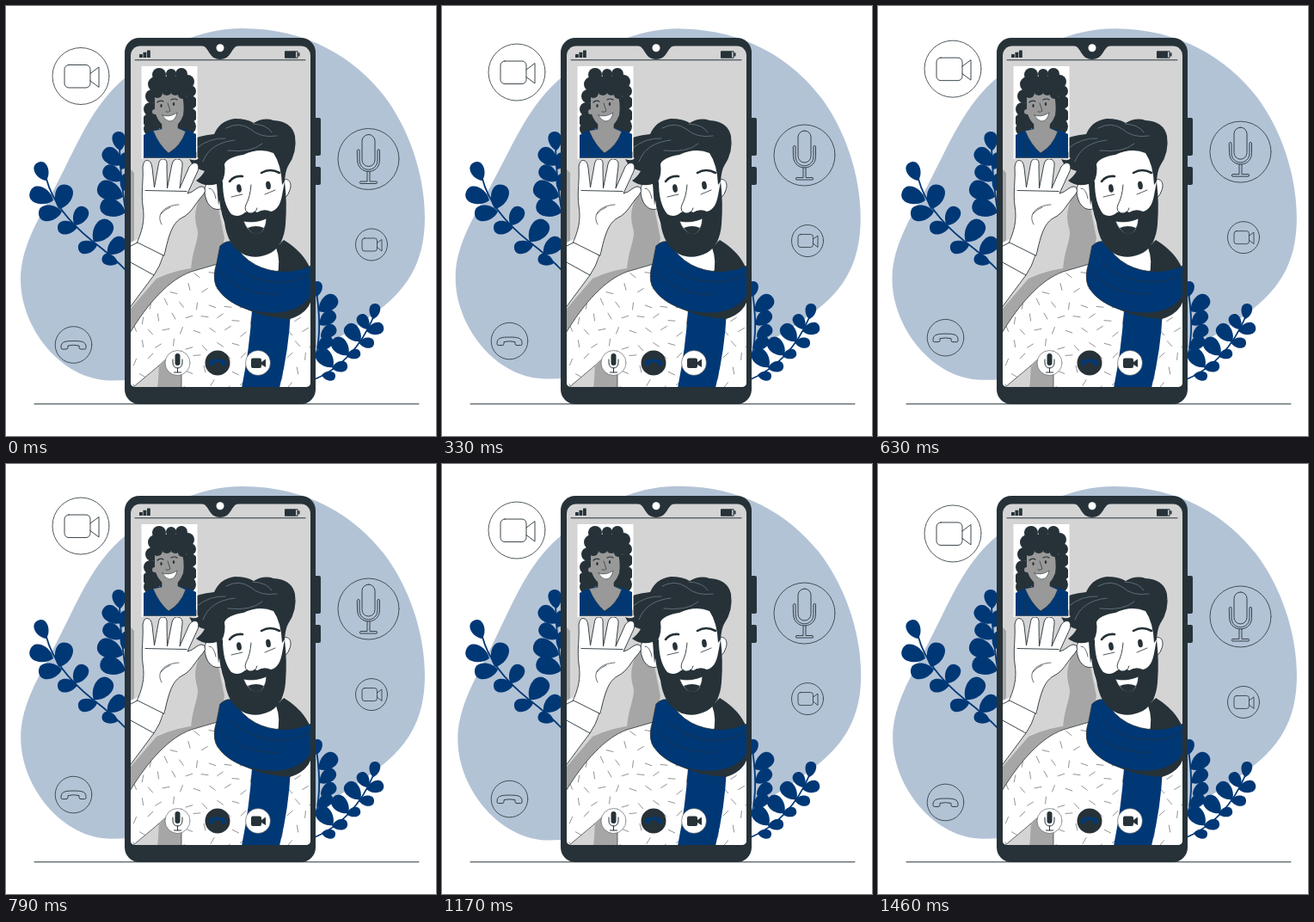
These frames come from a looping animation (500 px wide and 500 px high, 1500 ms). An HTML page with a canvas:

```html
<!DOCTYPE html>
<html lang="en">
<head>
<meta charset="utf-8">
<title>Video call</title>
<style>
html, body { margin: 0; width: 100%; height: 100%; overflow: hidden; background: #fff; }
canvas { display: block; width: 500px; height: 500px; }
</style>
</head>
<body>
<canvas id="stage"></canvas>
<script>
const INK = '#263238', NAVY = '#003876', PALE = '#b3c3d6';
const LIGHT = '#d4d4d4', SHADE = '#a6a6a6', SKIN = '#999', WHITE = '#fff';
const LOOP = 1500, STEPS = 36;

const canvas = document.getElementById('stage');
const ratio = window.devicePixelRatio || 1;
canvas.width = canvas.height = 500 * ratio;
let ctx = canvas.getContext('2d');

function paint(shape, fill, stroke, width = 0.9) {
  const path = typeof shape === 'string' ? new Path2D(shape) : shape;
  if (fill) { ctx.fillStyle = fill; ctx.fill(path); }
  if (stroke) { ctx.strokeStyle = stroke; ctx.lineWidth = width; ctx.stroke(path); }
}
const line = (d, color = INK, width = 0.9) => paint(d, null, color, width);

function circle(x, y, r, fill, stroke, width) {
  const p = new Path2D();
  p.arc(x, y, r, 0, Math.PI * 2);
  paint(p, fill, stroke, width);
}
function oval(x, y, rx, ry, angle, fill) {
  const p = new Path2D();
  p.ellipse(x, y, rx, ry, angle, 0, Math.PI * 2);
  paint(p, fill);
}
function box(x, y, w, h, r, fill, stroke, width) {
  const p = new Path2D();
  p.roundRect(x, y, w, h, r);
  paint(p, fill, stroke, width);
}
function clipped(d, draw) {
  ctx.save();
  ctx.clip(d instanceof Path2D ? d : new Path2D(d));
  draw();
  ctx.restore();
}

// Teardrop leaf from its base to its tip
function leaf([bx, by, tx, ty]) {
  const n = Math.hypot(tx - bx, ty - by);
  ctx.save();
  ctx.translate(bx, by);
  ctx.rotate(Math.atan2(ty - by, tx - bx));
  ctx.scale(n, n);
  paint('M0 0C.25 -.42 1 -.5 1 0C1 .5 .25 .42 0 0Z', NAVY);
  ctx.restore();
}
function branch(stem, leaves) {
  line(stem, NAVY, 1.8);
  leaves.forEach(leaf);
}

function plants() {
  branch('M47 201C54 228 74 252 100 273Q125 292 141 309', [
    [47, 203, 37, 182], [55, 226, 28, 216], [62, 236, 71, 208], [65, 239, 38, 242],
    [80, 255, 92, 234], [83, 257, 60, 258], [102, 274, 121, 250], [106, 278, 84, 282],
    [118, 288, 138, 271], [130, 299, 112, 292]
  ]);
  branch('M132 164Q133 205 141 250', [
    [133, 168, 130, 146], [134, 185, 114, 167], [135, 203, 114, 188], [136, 222, 107, 209],
    [139, 240, 110, 230], [134, 190, 142, 171], [136, 215, 143, 195]
  ]);
  branch('M357 435Q405 415 428 360', [
    [427, 364, 430, 346], [421, 376, 411, 359], [412, 390, 396, 371], [398, 406, 381, 387],
    [380, 420, 363, 400], [419, 378, 439, 373], [410, 391, 428, 392], [396, 407, 412, 403],
    [379, 421, 397, 418], [367, 429, 383, 431]
  ]);
  branch('M357 417Q369 385 361 333', [
    [361, 338, 362, 320], [364, 355, 384, 338], [365, 371, 382, 356],
    [366, 385, 383, 373], [363, 400, 378, 385]
  ]);
}

function bubbles() {
  circle(87, 81.5, 33, null, INK, 0.8);
  box(68, 68.5, 30, 26.5, 5, null, INK, 0.9);
  line('M98 78.5L108 71V94.5L98 87');

  circle(421.5, 178, 35.5, null, INK, 0.8);
  box(414, 149.5, 15, 37, 7.5, null, INK);
  line('M408.5 167.5Q409.7 166 411 167.5V179C411 194 432 194 432 179V167.5Q433.2 166 434.5 167.5V179C434.5 197 408.5 197 408.5 179Z');
  line('M420 192.5V204H412Q410.5 205.5 412 206.5H431Q432.5 205.5 431 204H423V192.5');

  circle(425, 277.5, 18.5, null, INK, 0.8);
  box(414, 270, 17.5, 15, 3, null, INK, 0.8);
  line('M431.5 275.5L437 271.5V285L431.5 280.5', INK, 0.8);

  circle(78.5, 394, 21.3, null, INK, 0.8);
  line('M64 396C64 390 70 389.5 78.5 389.5S93 390 93 396V397.5Q93 399 91.5 399H87Q85 399 85 397V395Q78.5 393.5 72 395V397Q72 399 70 399H65.5Q64 399 64 397.5Z');
}

function sweater() {
  const body = 'M143 382C165 345 190 318 215 309Q232 304 246 300L356 330V445H143Z';
  paint(body, WHITE, INK, 0.8);
  clipped(body, () => {
    for (let row = 0; row < 9; row++) {
      for (let col = 0; col < 13; col++) {
        const k = Math.sin(row * 12.9898 + col * 78.233) * 43758.5453;
        const spin = (k - Math.floor(k)) * Math.PI;
        const x = 150 + col * 18 + (row % 2) * 9, y = 314 + row * 16 + 4 * Math.sin(k);
        const dx = 4 * Math.cos(spin), dy = 4 * Math.sin(spin);
        line(`M${x - dx} ${y - dy}L${x + dx} ${y + dy}`, '#777', 0.8);
      }
    }
  });
  paint('M147 444L178 418L176 444Z', LIGHT);
  paint('M176 444L178 419Q191 405 204 401V444Z', SHADE);
  line('M147 444L178 418Q191 405 204 401V444', INK, 0.7);
}

function hand() {
  paint('M143 276L158 269L186 287L171 315L143 353Z', WHITE);
  line('M172 313L143 352');
  paint('M151 278C158 263 162 250 159 232C157 217 160 202 159 187Q160 179 164.5 179.5Q169 180 170 188L172.5 211L177 186Q178 177 183 178Q188 178 187 187L187.5 212L193 184Q195 177 200 178Q206 179 205 186L202 212L213 187Q217 181 222 183Q225 186 223 192L211 218Q216 217 222 212Q228 208 231 212Q233 215 229 220C220 229 216 241 205 246C194 252 190 263 184 290Z', WHITE, INK, 0.9);
  line('M162 214.5L210 215.5');
  line('M181 254C174 242 184 232 201 231M180 242Q185 236 191 234', INK, 0.7);
  paint('M145 279L153 275L183 290Q179 303 172 313L143 297Z', WHITE, INK, 0.9);
}

function scarf() {
  paint('M272 280V300Q290 314 318 313L320 272Z', WHITE, INK, 0.8);
  paint('M315 314Q320 297 314 281L323 272Q346 286 354 306V336L325 322Z', INK);
  paint('M286 354L331 354Q329 400 318 444H274Q283 400 286 354Z', NAVY);
  paint('M262 342Q286 361 330 364Q350 358 355 342L350 326Z', INK);
  paint('M249 279Q257 271 266 275Q272 291 290 301Q319 316 355 302V336Q342 357 310 357C282 357 254 345 244 325Q240 314 245 299Z', NAVY, INK, 0.8);
  line('M246 305C259 325 287 337 317 335M262 299Q283 321 321 321M321 321Q342 320 354 311', INK, 0.7);
}

function head() {
  paint('M248 208C239 201 230 205 231 216C232 229 239 239 250 236Z', WHITE, INK);
  paint('M320 203C329 198 333 206 330 214Q327 224 320 224Z', WHITE, INK);
  line('M236 212Q242 212 244 224', INK, 0.7);
  paint('M247 185Q260 165 295 164Q318 168 322 190L325 240Q324 278 294 288Q258 284 250 240Z', WHITE);
  // Hair
  paint('M247 232L245 207Q231 211 221 203Q227 199 231 192Q217 188 213 178Q221 181 224 177Q211 168 214 157Q222 151 242 149Q249 133 266 131Q280 131 288 136Q300 129 311 133Q332 134 336 151Q339 170 328 186Q325 191 324 204L321 208Q320 184 311 171Q295 164 276 173Q257 176 254 184Q256 195 251 205Z', INK);
  line('M229 181Q237 159 266 156M222 165Q237 153 255 154M256 142Q271 134 284 143Q296 154 315 151M287 137Q304 138 309 147M258 168Q285 171 298 160', '#87919a', 0.6);
  // Beard
  paint('M246 207L252 204Q252 230 262 242Q270 247 278 240Q286 236 292 240Q300 235 308 239Q318 237 321 220L324 204Q327 228 325 254Q323 278 308 287Q290 296 275 288Q258 279 254 252Q248 235 246 207Z', INK);
  paint('M276 250Q289 253 303 247Q302 263 292 265Q281 264 276 250Z', WHITE, INK, 0.8);
  paint('M281 258Q291 254 300 258Q297 265 291 265Q285 264 281 258Z', INK);
  // Face
  paint('M284 208Q289 221 291 232Q291 241 283 241Q277 238 279 232Z', WHITE);
  line('M285 208Q284 222 279 231Q276 239 283 241Q290 242 292 235');
  oval(271, 212, 2.8, 4.8, -0.15, INK);
  oval(305, 208.5, 2.8, 4.8, -0.15, INK);
  line('M260 204Q265 197 275 198M297 194Q307 188 318 194', INK, 2.6);
  line('M262 222L275 219M301 219L313 214', INK, 0.8);
}

function thumbnail() {
  box(157.5, 70, 65, 108, 0, WHITE);
  const area = new Path2D();
  area.rect(160, 70, 61, 106.5);
  clipped(area, () => {
    const curls = [
      [178, 80, 8], [192, 79, 6], [204, 79, 7], [211, 88, 8], [214, 99, 7], [214, 112, 8],
      [213, 127, 9], [211, 140, 10], [174, 91, 9], [170, 105, 8], [168, 120, 8],
      [167, 133, 8], [169, 143, 9]
    ];
    curls.forEach(([x, y, r]) => circle(x, y, r, INK));
    paint('M176 82H208L212 142H168Z', INK);
    paint('M160 150Q170 144 180 142H201Q214 145 221 149V177H160Z', NAVY);
    paint('M181 132L181 143L171 145Q178 162 189 171Q203 163 209 146L200 142V130Z', SKIN, INK, 0.6);
    paint('M173 104Q187 92 204 101Q208 114 206 127Q201 141 191 142Q177 139 173 122Z', SKIN);
    circle(173, 123, 3, SKIN);
    [[176, 101, 6], [187, 98, 6], [197, 98, 6], [205, 103, 5]].forEach(([x, y, r]) => circle(x, y, r, INK));
    oval(180.5, 116, 1.2, 2.1, 0, INK);
    oval(195, 114, 1.2, 2.1, 0, INK);
    line('M176 112Q179 109 183 111M192 109Q196 107 199 109', INK, 1.2);
    line('M188 113Q190 119 191 122Q189 124 186 123', INK, 0.7);
    paint('M182 127Q190 130 199 124Q197 134 190 134Q185 133 182 127Z', WHITE, INK, 0.6);
    line('M170 156V176M211 158V176', INK, 0.7);
  });
  line('M160 176.7H221V170', INK, 0.8);
}

function callButtons() {
  circle(199.5, 415, 14.5, WHITE, INK, 0.5);
  box(196.5, 404, 6, 14, 3, INK);
  line('M194 411V415C194 423 205 423 205 415V411M199.5 421V426M195.5 426H203.5', INK, 1);

  circle(246, 415, 14.5, INK);
  paint('M236 416C236 411 241 410.5 246 410.5S256 411 256 416V418H250.5V414.5Q246 413.5 241.5 414.5V418H236Z', NAVY);

  circle(293, 415, 14.5, WHITE, INK, 0.5);
  box(285, 409.5, 12, 11.5, 2, INK);
  paint('M297 414L302 410.5V420L297 417Z', INK);
}

function phone() {
  box(356, 130, 10, 44, 2, INK);
  box(356, 187, 10, 21, 2, INK);
  box(138, 37, 222, 426, 17, INK);
  const screen = new Path2D();
  screen.roundRect(145, 46.5, 209, 396.5, [11, 11, 5, 5]);
  paint(screen, LIGHT);
  clipped(screen, () => {
    paint('M145 190L149 194V272L145 276Z', SHADE);
    paint('M236 207C222 225 217 240 222 258C226 270 216 283 215 309L247 301L254 270L247 235Z', SHADE);
    paint('M145 380V352L175 317Q198 306 225 304L214 310C190 319 165 347 145 380Z', SHADE);
    sweater();
    scarf();
    head();
    hand();
    thumbnail();
    callButtons();
  });
  paint('M227 46C237 47 235 62 249 62S261 47 271 46Z', INK);
  circle(249, 48.8, 4.5, WHITE);
  line('M150 62.8H348', INK, 1);
  for (let i = 0; i < 3; i++) box(155 + i * 4.5, 56 - i * 2.2, 3.8, 4 + i * 2.2, 0.5, INK);
  box(324, 52.3, 15.5, 8.4, 0.8, INK);
  box(337, 53.3, 1.4, 6.4, 0, LIGHT);
  box(339.5, 54.3, 2, 4.2, 0.5, INK);
}

// The unmoving layer is drawn once
const still = document.createElement('canvas');
still.width = still.height = canvas.width;
const live = ctx;
ctx = still.getContext('2d');
ctx.scale(ratio, ratio);
ctx.lineJoin = ctx.lineCap = 'round';
plants();
line('M33 462.8H480', INK, 1);
phone();
ctx = live;

function blob(degrees) {
  ctx.save();
  ctx.translate(252, 231);
  ctx.rotate(degrees * Math.PI / 180);
  ctx.translate(-252, -231);
  paint('M275 26C350 26 405 60 440 105C468 142 487 195 487 246C487 300 465 332 425 360C395 383 365 400 325 407C260 418 185 435.5 122 435.5C64 435 17 374 17 318C17 278 41 243 61 203C82 163 100 115 139 83C178 48 226 26 275 26Z', PALE);
  ctx.restore();
}

// Sway: 0, +1, -1, 0 degrees at 0, 25, 75 and 100 % of the loop
const sway = p => p < 0.25 ? p * 4 : p < 0.75 ? 2 - p * 4 : p * 4 - 4;
const lift = p => -10 * (1 - Math.abs(1 - 2 * p));

function frame(now) {
  const p = Math.floor((now % LOOP + 4) * STEPS / LOOP) % STEPS / STEPS;
  ctx.setTransform(ratio, 0, 0, ratio, 0, 0);
  ctx.lineJoin = ctx.lineCap = 'round';
  ctx.fillStyle = WHITE;
  ctx.fillRect(0, 0, 500, 500);
  blob(sway(p));
  ctx.save();
  ctx.translate(0, lift(p));
  bubbles();
  ctx.restore();
  ctx.drawImage(still, 0, 0, 500, 500);
}

const start = performance.now();
function tick() {
  frame(performance.now() - start);
  requestAnimationFrame(tick);
}
tick();
</script>
</body>
</html>
```
